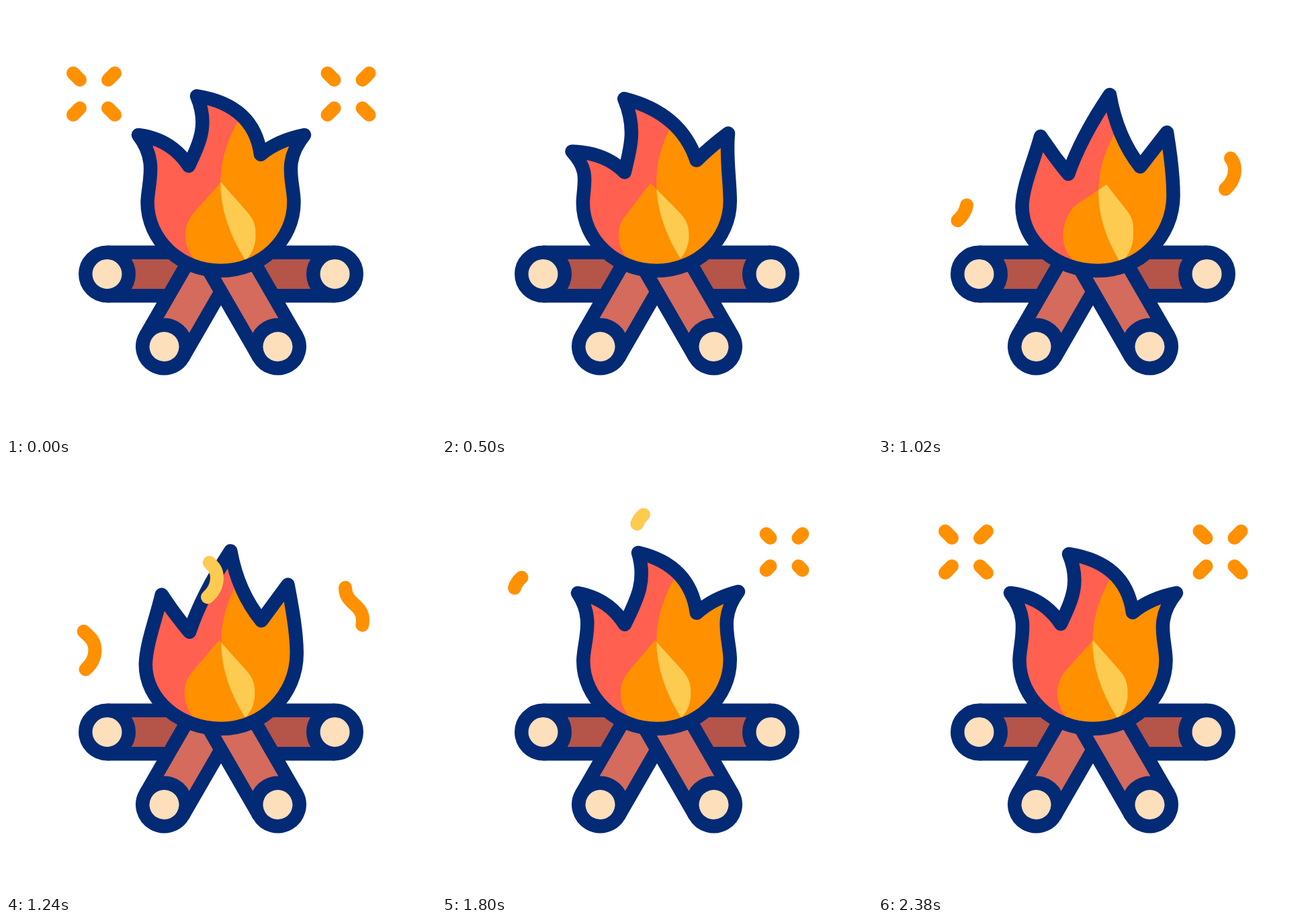
Write an HTML page that moves like this. It is 640x640 px and loops after 2400 ms.

```html
<!DOCTYPE html>
<html lang="en">
<head>
<meta charset="utf-8">
<title>Campfire</title>
<style>
  html, body { margin: 0; width: 100%; height: 100%; overflow: hidden; background: #fff; }
  svg { display: block; width: 100%; height: 100%; }
  .line { stroke: #032a75; stroke-width: 20.5; stroke-linejoin: round; }
  .spark { fill: none; stroke: #ff9000; stroke-width: 20; stroke-linecap: round; }
  .end { fill: #fddfbc; }
</style>
</head>
<body>
<svg viewBox="0 0 640 640">
  <defs>
    <clipPath id="inFlame"><path class="flame"/></clipPath>
    <clipPath id="inSplit"><path class="split"/></clipPath>
  </defs>
  <g id="logs"></g>
  <g clip-path="url(#inFlame)">
    <path class="flame" fill="#ff6050"/>
    <path class="split" fill="#ff9000"/>
    <path class="drop" fill="#ff9000"/>
    <path class="drop" fill="#fccb50" clip-path="url(#inSplit)"/>
  </g>
  <path class="flame line" fill="none"/>
  <g id="sparks"></g>
</svg>
<script>
const LOOP = 2400;
const svg = document.querySelector('svg');

function add(parent, tag, attrs) {
  const el = document.createElementNS('http://www.w3.org/2000/svg', tag);
  for (const k in attrs) el.setAttribute(k, attrs[k]);
  return parent.appendChild(el);
}
const byId = id => document.getElementById(id);
const setPath = (name, d) => svg.querySelectorAll('.' + name).forEach(el => el.setAttribute('d', d));
const ramp = (t, a, b) => Math.min(1, Math.max(0, (t - a) / (b - a)));

// Logs, back to front
function addLog(x, y, angle, color) {
  const g = add(byId('logs'), 'g', { transform: `translate(${x} ${y}) rotate(${angle})` });
  add(g, 'path', { class: 'line', d: 'M0-32.2H160V32.2H0', fill: color });
  add(g, 'circle', { class: 'line end', r: 32.2 });
}
addLog(150.5, 399, 0, '#b55448');
addLog(489.5, 399, 180, '#b55448');
addLog(235.5, 507, -60, '#d46b5c');
addLog(404.5, 507, -120, '#d46b5c');

// Key poses: time, sway of the body, the three tips, drop tip x, curl of left and right tongues
const key = (t, sway, left, mid, right, drop, curl, curlR) =>
  ({ t, v: [sway, ...left, ...mid, ...right, drop, curl, curlR] });
const keys = [
  key(0, 0, [197, 192], [284, 134], [444, 192], 320, 1, 1),
  key(280, -5.5, [185, 215], [262, 139], [422, 184], 303, 0.95, 0.4),
  key(720, 6, [210, 217], [291, 136], [430, 195], 323, 0.7, 0.1),
  key(1020, 7.5, [242, 194], [345, 132], [430, 188], 340, 0, 0),
  key(1460, -6, [216, 195], [316, 128], [409, 174], 294, 0, 0),
  key(1800, 0, [202, 192], [292, 132], [441, 190], 317, 0.92, 0.93)
];
keys.push({ ...keys[0], t: LOOP });

// Slope at key k for value i, flat at turning points
function slope(k, i) {
  const [p, c, n] = [keys[k - 1], keys[k], keys[k + 1]];
  if (!p || !n) return 0;
  const a = (c.v[i] - p.v[i]) / (c.t - p.t);
  const b = (n.v[i] - c.v[i]) / (n.t - c.t);
  return a * b > 0 ? 2 * a * b / (a + b) : 0;
}

function poseAt(t) {
  const k = keys.findIndex(key => t < key.t) - 1;
  const a = keys[k], b = keys[k + 1];
  const span = b.t - a.t, u = (t - a.t) / span;
  const s = u * u * (3 - 2 * u);
  return a.v.map((v, i) => v + (b.v[i] - v) * s +
    span * u * (1 - u) * ((1 - u) * slope(k, i) - u * slope(k + 1, i)));
}

// Cubic from a to b; o1 and o2 push its handles off the straight line
function edge(a, b, o1, o2 = o1) {
  const at = (f, o) => a.map((v, i) => v + (b[i] - v) * f + o[i]);
  return `C${at(1 / 3, o1)} ${at(2 / 3, o2)} ${b}`;
}

function drawFlame(t) {
  const [s, lx, ly, mx, my, rx, ry, tip, curl, curlR] = poseAt(t);
  const L = [lx, ly], M = [mx, my], R = [rx, ry];
  const notchL = [272 + 1.5 * s, 250 - 12 * curlR];
  const notchR = [379 + 1.5 * s, 232.5 + 0.9 * s - 11.5 * curlR];

  // Round body below the tongues
  const mid = 319.5 + s, half = 112.5 - 3.5 * curl, base = 394, K = 0.552;
  const xl = mid - half, yl = 298 - 6 * curl;
  const xr = mid + half, yr = 282 + 10 * curl;
  setPath('flame', `M${L}` +
    `C${lx + (xl - lx) / 3 + 25 * curl} ${ly + (yl - ly) / 3 + 5 * curl} ${xl + 1} ${yl - 31} ${xl} ${yl}` +
    `C${xl} ${yl + K * (base - yl)} ${mid - half * (1 - K)} ${base} ${mid} ${base}`.replace(
      `${mid - half * (1 - K)}`, `${mid - half * K}`) +
    `S${xr} ${yr + K * (base - yr)} ${xr} ${yr}` +
    `C${xr} ${yr - 31} ${rx + (xr - rx) / 3 + 2 - 30 * curlR} ${ry + (yr - ry) / 3 + 7 * curlR} ${R}` +
    edge(R, notchR, [-4.5 * curlR, -4.5 * curlR]) +
    edge(notchR, M, [33 * curl - 8, 6 - 26 * curl]) +
    edge(M, notchL, [28 * curl - 6, 8 * curl], [19 * curl - 7, 0]) +
    edge(notchL, L, [9 * curl - 1, 1 - 12 * curl]) + 'Z');

  // Inner drop, tilted towards its tip
  const c = 319.3 + 0.42 * (tip - 320), tilt = tip - c;
  const w = 52.3, r = w * K, f = 0.3;
  const ty = 262 + 0.3 * Math.abs(tilt);
  const ax = c - 37.5 + 0.45 * tilt, ay = 305 - 0.8 * tilt;
  const bx = c + 39 + 0.4 * tilt, by = 306;
  setPath('drop', `M${tip} ${ty}L${ax} ${ay}` +
    `C${ax + (ax - tip) * f} ${ay + (ay - ty) * f} ${c - w} 328 ${c - w} 342` +
    `C${c - w} 371 ${c - r} 394 ${c} 394S${c + w} 371 ${c + w} 342` +
    `C${c + w} 328 ${bx + (bx - tip) * f} ${by + (by - ty) * f} ${bx} ${by}Z`);

  // Everything right of one sweeping curve is the lighter half
  const top = 346 + 2.5 * s, end = 356 + 0.3 * s;
  setPath('split', `M${top + 15} 143L${top} 170Q${288 + 0.9 * s} 270 ${end} 378` +
    `L${end + 20} 420H600V143Z`);
}

// Rising wisps: y is the centre at 1460 ms, head and tail are trim times
const wisps = [
  { x: 119.5, y: 241, speed: 0.062, head: [870, 1525], tail: [1305, 1895] },
  { x: 518, y: 199.5, speed: 0.05, head: [727, 1400], tail: [1110, 1700] },
  { x: 301, y: 139, speed: 0.037, head: [1040, 1440], tail: [1470, 1855], color: '#fdcb50' }
];
for (const w of wisps) {
  w.el = add(byId('sparks'), 'path', {
    class: 'spark', pathLength: 1,
    d: 'M-1 51C9 42 13 33 13 22C13-2-13-2-13-26C-13-37-7-46-1-51'
  });
  if (w.color) w.el.style.stroke = w.color;
}

function drawWisp(w, t) {
  const a = ramp(t, ...w.tail), b = ramp(t, ...w.head);
  w.el.style.display = b > a ? '' : 'none';
  w.el.setAttribute('transform', `translate(${w.x} ${w.y - (t - 1460) * w.speed})`);
  w.el.setAttribute('stroke-dasharray', `${Math.max(0.001, b - a)} 2`);
  w.el.setAttribute('stroke-dashoffset', -a);
}

// Bursts of four diagonal dashes
const bursts = [
  { x: 131, grow: [1900, 2170], shrink: [240, 440] },
  { x: 509.5, grow: [1700, 1870], shrink: [20, 240] }
];
for (const b of bursts) {
  b.el = add(byId('sparks'), 'path', { class: 'spark', transform: `translate(${b.x} 131)` });
}

function drawBurst(b, t) {
  const growing = t >= b.grow[0];
  const near = growing ? 21 : 21 + 10 * ramp(t, ...b.shrink);
  const far = growing ? 21 + 10 * ramp(t, ...b.grow) : 31;
  b.el.style.display = far > near ? '' : 'none';
  let d = '';
  for (const sx of [-1, 1])
    for (const sy of [-1, 1])
      d += `M${sx * near} ${sy * near}L${sx * far} ${sy * far}`;
  b.el.setAttribute('d', d);
}

function draw(t) {
  drawFlame(t);
  wisps.forEach(w => drawWisp(w, t));
  bursts.forEach(b => drawBurst(b, t));
}

let start = null;
function tick(now) {
  if (start === null) start = now;
  draw(Math.max(0, now - start) % LOOP);
  requestAnimationFrame(tick);
}
draw(0);
requestAnimationFrame(tick);
</script>
</body>
</html>
```
